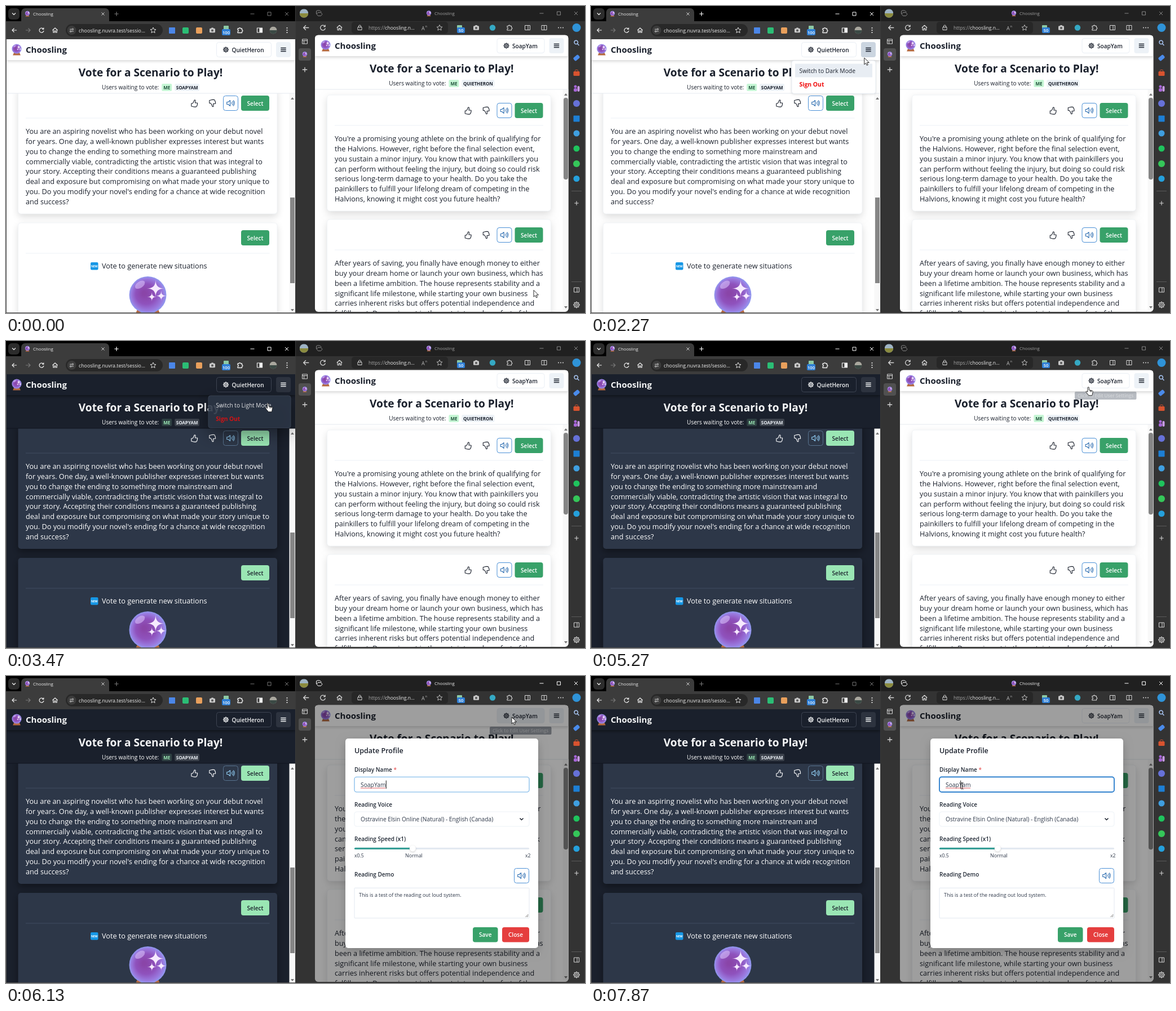
Write an HTML page with a canvas that moves like this. It is 1027x545 px and loops after 8 s.

```html
<!DOCTYPE html>
<html lang="en">
<head>
<meta charset="utf-8">
<title>Choosling</title>
<style>
html, body { margin: 0; width: 100%; height: 100%; overflow: hidden; background: #000; }
canvas { display: block; width: 1027px; height: 545px; }
</style>
</head>
<body>
<canvas id="stage"></canvas>
<script>
const W = 1027, H = 545, LOOP = 8000, STEP = 200 / 3;
const canvas = document.getElementById('stage');
const dpr = window.devicePixelRatio || 1;
canvas.width = W * dpr;
canvas.height = H * dpr;
const c = canvas.getContext('2d');
c.scale(dpr, dpr);

const FONT = '"Open Sans", "Noto Sans", sans-serif';
const BODY = 12.68, LABEL = 10.3;
const APP = 'Choosling', LEFT_USER = 'QuietHeron', RIGHT_USER = 'SoapYam';

const light = {
  bg: '#fff', card: '#fff', text: '#1a202c', body: '#1a202c', line: '#edf2f7', border: '#e9eef4',
  burger: '#edf2f7', hover: '#e2e8f0', pressed: '#cbd5e0', go: '#38a169', goHover: '#2f855a', goText: '#fff',
  meBg: '#c6f6d5', me: '#22543d', badgeBg: '#edf2f7', badge: '#1a202c',
  sound: '#2b6cb0', soundBorder: '#4a8fd6', shadow: 'rgba(0,0,0,.14)', menu: '#fff'
};
const dark = {
  bg: '#1a202c', card: '#2d3748', text: '#f4f5f6', body: '#fff', line: '#414d60', border: '#3d4452',
  burger: '#2d333f', hover: '#3d4452', pressed: '#4a5160', go: '#9ae6b4', goHover: '#68d391', goText: '#1a202c',
  meBg: '#2e4042', me: '#9ae6b4', badgeBg: '#3c424c', badge: '#e8edf3',
  sound: '#90cdf4', soundBorder: '#58738f', shadow: 'rgba(0,0,0,.4)', menu: '#2d3748'
};

const novel = [
  'You are an aspiring novelist who has been working on your debut novel',
  'for years. One day, a well-known publisher expresses interest but wants',
  'you to change the ending to something more mainstream and',
  'commercially viable, contradicting the artistic vision that was integral to',
  'your story. Accepting their conditions means a guaranteed publishing',
  'deal and exposure but compromising on what made your story unique to',
  "you. Do you modify your novel's ending for a chance at wide recognition",
  'and success?'];
const athlete = [
  "You're a promising young athlete on the brink of qualifying for",
  'the Halvions. However, right before the final selection event,',
  'you sustain a minor injury. You know that with painkillers you',
  'can perform without feeling the injury, but doing so could risk',
  'serious long-term damage to your health. Do you take the',
  'painkillers to fulfill your lifelong dream of competing in the',
  'Halvions, knowing it might cost you future health?'];
const savings = [
  'After years of saving, you finally have enough money to either',
  'buy your dream home or launch your own business, which has',
  'been a lifetime ambition. The house represents stability and a',
  'significant life milestone, while starting your own business',
  'carries inherent risks but offers potential independence and',
  'fulfillment. Do you invest in the certainty and comfort of the'];

// Icons are centred on 0,0.
const icons = {
  back: 'M4 0H-4M-.5-3.5L-4 0L-.5 3.5', fwd: 'M-4 0H4M.5-3.5L4 0L.5 3.5',
  reload: 'M3.2-2.4A4 4 0 1 0 4 .8M3.8-4.6v2.8H1', home: 'M-4.5 0L0-4L4.5 0M-3.2-1V4H-1V1H1V4H3.2V-1',
  plus: 'M-3.7 0h7.4M0-3.7v7.4', min: 'M-3.5 0h7', max: 'M-3-3h6v6h-6z', close: 'M-3-3L3 3M3-3L-3 3',
  down: 'M-3-1.5L0 1.5L3-1.5',
  star: 'M0-5L1.5-1.6 5-1.3 2.3 1 3.1 4.6 0 2.7-3.1 4.6-2.3 1-5-1.3-1.5-1.6z',
  puzzle: 'M-4-3h2.3a1.4 1.4 0 0 1 2.8 0H3.5V-.5a1.4 1.4 0 0 1 0 2.8V4.5H-4V2.3a1.4 1.4 0 0 0 0-2.8z',
  lock: 'M-3.5-1h7v5h-7zM-2-1v-1.5a2 2 0 0 1 4 0V-1M0 1v1', split: 'M-4.5-4h9v8h-9zM0-4v8',
  panel: 'M-4.5-4h9v8h-9zM1-4v8', tabs: 'M-4.5-4h9v8h-9zM-4.5-1.5h9M-1.5-1.5v5.5',
  search: 'M1.5 1.5L4.5 4.5M2.4-1a3.2 3.2 0 1 1-6.4 0a3.2 3.2 0 1 1 6.4 0',
  burger: 'M-4.7-3h9.4M-4.7 0h9.4M-4.7 3h9.4',
  stack: 'M-5-3a2 2 0 0 1 2-2h4l3 3M-2-1.5h5l2.5 3-2.5 3h-5l-2.5-3zM-5-3v4',
  tune: 'M-4-2H0M3.6-2a1.5 1.5 0 1 1-3 0a1.5 1.5 0 1 1 3 0M4 2.3H0M-.6 2.3a1.5 1.5 0 1 1-3 0a1.5 1.5 0 1 1 3 0',
  thumb: 'M-5.2 0H-3L-.6-3.6L-.2-5.6C1.4-7 2.4-5.4 2-3.6L1.5-1H4.6c1.5 0 1.3 1.7.6 2 .6.6.3 1.6-.3 1.9.3.8 0 1.4-.6 1.7 0 1-.6 1.5-1.5 1.5H0C-1.8 6.1-2.4 5-5.2 5z',
  sound: 'M-6.3-2h2.4l3.5-3v10l-3.5-3h-2.4zM1.9-1.9a3 3 0 0 1 0 3.8M3.6-3.6a5.4 5.4 0 0 1 0 7.2M5.2-5.1a7.6 7.6 0 0 1 0 10.2'
};
const cursors = {
  arrow: 'M0 0V11.8L2.7 9.3 4.5 13.3 6.5 12.4 4.7 8.5H8.5z',
  hand: 'M0 1a1.2 1.2 0 0 1 2.4 0V5l5.4 1.2c1.1.3 1.5 1 1.4 2L8.5 12c-.2 1.2-.5 2-.9 2.8H2C.6 13-1 11-2.8 8.8c-.8-1.3.8-2.2 1.8-1.2L0 8.5z',
  beam: 'M-2.2-5.8Q0-5.8 0-4.8Q0-5.8 2.2-5.8M0-5V5M-2.2 5.8Q0 5.8 0 4.8Q0 5.8 2.2 5.8'
};
for (const set of [icons, cursors]) for (const k in set) set[k] = new Path2D(set[k]);

const clamp = v => Math.max(0, Math.min(1, v));
const ramp = (t, from, ms) => clamp((t - from) / ms);

function rect(x, y, w, h, fill, r = 0, stroke, lw = 1) {
  c.beginPath();
  c.roundRect(x, y, w, h, r);
  if (fill) { c.fillStyle = fill; c.fill(); }
  if (stroke) { c.strokeStyle = stroke; c.lineWidth = lw; c.stroke(); }
}
function dot(x, y, r, fill) {
  c.fillStyle = fill;
  c.beginPath();
  c.arc(x, y, r, 0, 7);
  c.fill();
}
function text(s, x, y, size, color, weight = 400, align = 'left') {
  c.font = `${weight} ${size}px ${FONT}`;
  c.textAlign = align;
  c.fillStyle = color;
  c.fillText(s, x, y);
  return c.measureText(s).width;
}
function icon(name, x, y, color, lw = 1.1, sx = 1, sy = sx) {
  c.save();
  c.translate(x, y);
  c.scale(sx, sy);
  c.strokeStyle = color;
  c.lineWidth = lw;
  c.lineJoin = 'round';
  c.stroke(icons[name]);
  c.restore();
}
function shadow(color, blur, dy) {
  c.shadowColor = color;
  c.shadowBlur = blur * dpr;
  c.shadowOffsetY = dy * dpr;
}
const noShadow = () => shadow('transparent', 0, 0);
function faded(alpha, draw) {
  if (alpha <= 0) return;
  c.save();
  c.globalAlpha = alpha;
  draw();
  c.restore();
}
function clipped(x, y, w, h, r, draw) {
  c.save();
  c.beginPath();
  c.roundRect(x, y, w, h, r);
  c.clip();
  draw();
  c.restore();
}

function gear(x, y, color, r = 3.4) {
  c.strokeStyle = color;
  c.lineWidth = 1.1;
  c.beginPath();
  for (let i = 0; i <= 64; i++) {
    const a = i / 64 * Math.PI * 2, d = r + .3 + Math.tanh(3 * Math.cos(a * 8)) * .8;
    c.lineTo(x + Math.cos(a) * d, y + Math.sin(a) * d);
  }
  c.closePath();
  c.stroke();
  c.beginPath();
  c.arc(x, y, r * .42, 0, 7);
  c.stroke();
}
function sparkle(x, y, r) {
  c.fillStyle = '#f6eaff';
  c.beginPath();
  c.moveTo(x, y - r);
  for (let i = 1; i <= 4; i++) {
    const a = i * Math.PI / 2 - Math.PI / 2;
    c.quadraticCurveTo(x, y, x + Math.cos(a) * r, y + Math.sin(a) * r);
  }
  c.fill();
}
function ball(x, y, r) {
  c.fillStyle = '#b5693f';
  c.beginPath();
  c.moveTo(x - r * .55, y + r * .75);
  c.lineTo(x + r * .55, y + r * .75);
  c.lineTo(x + r * .8, y + r * 1.35);
  c.lineTo(x - r * .8, y + r * 1.35);
  c.fill();
  const g = c.createRadialGradient(x - r * .2, y - r * .1, r * .1, x, y, r);
  g.addColorStop(0, '#8a45a8');
  g.addColorStop(.5, '#8f52bd');
  g.addColorStop(.85, '#9a7be0');
  g.addColorStop(1, '#8f9af0');
  dot(x, y, r, g);
  c.fillStyle = 'rgba(215,190,248,.6)';
  c.beginPath();
  c.ellipse(x - r * .42, y - r * .55, r * .3, r * .17, -.6, 0, 7);
  c.fill();
  sparkle(x + r * .42, y - r * .35, r * .46);
  sparkle(x + r * .72, y + r * .05, r * .26);
  sparkle(x + r * .22, y + r * .1, r * .24);
}

function button(x, y, w, h, label, fill, color) {
  rect(x, y, w, h, fill, 4);
  text(label, x + w / 2, y + h / 2 + 4, 10.1, color, 600, 'center');
}
function soundButton(x, y, p) {
  rect(x + .5, y + .5, 26, 26, null, 4, p.soundBorder);
  icon('sound', x + 13, y + 13.5, p.sound, 1.1);
}
function card(x, y, w, h, p, lines, hover, plain) {
  shadow(p.shadow, 13, 5);
  rect(x, y, w, h, p.card, 5);
  noShadow();
  if (p === light) rect(x, y, w, h, null, 5, '#eef1f5', .8);
  const r = x + w - 14;
  if (!plain) {
    icon('thumb', r - 133, y + 28, p.body, 1.1);
    icon('thumb', r - 101, y + 27.5, p.body, 1.1, 1, -1);
    soundButton(r - 82, y + 14, p);
  }
  button(r - 50, y + 14 - (plain ? 1 : 0), 50, 27, 'Select', hover ? p.goHover : p.go, p.goText);
  rect(x + 13.5, y + 53.5, w - 27, 1, p.line);
  lines.forEach((s, i) => text(s, x + 13.5, y + 82.3 + i * 17.75, BODY, p.body));
}
function scrollbar(x, top, bottom, from, to, round) {
  rect(x, top, 10.5, bottom - top, '#f8f8f8');
  rect(x + 1.5, from, 8, to - from, '#868686', round);
  c.fillStyle = '#777';
  for (const [y, d] of [[top + 9, -1], [bottom - 5, 1]]) {
    c.beginPath();
    c.moveTo(x + 2.5, y - d * 2);
    c.lineTo(x + 8.5, y - d * 2);
    c.lineTo(x + 5.5, y + d * 2);
    c.fill();
  }
}
function badge(s, x, y, w, bg, color) {
  rect(x, y, w, 13, bg, 2);
  text(s, x + w / 2, y + 9.5, 8, color, 700, 'center');
}
function page(x, y, w, p, user, other, burger, userBg) {
  const cx = x + w / 2, r = x + w;
  c.font = `400 10.1px ${FONT}`;
  const label = 'Users waiting to vote:', lw = c.measureText(label).width;
  c.font = `700 8px ${FONT}`;
  const bw = c.measureText(other).width + 5;
  rect(x, y + 37, w, 59, p.bg);
  rect(x, y + 95.5, w, 1, p === light ? '#e6eaef' : '#11151e');
  shadow(p === light ? 'rgba(0,0,0,.17)' : 'rgba(0,0,0,.45)', 5, 2);
  clipped(x, y, w, 48, 0, () => rect(x, y, w, 37, p.bg));
  noShadow();
  ball(x + 19, y + 17, 8.6);
  text(APP, x + 35, y + 24, 15, p.text, 700);
  const bx = r - 42 - (user === LEFT_USER ? 98 : 85);
  rect(bx + .5, y + 5.5, r - 43 - bx, 26, userBg, 4, p.border);
  gear(bx + 17, y + 18.5, p.text);
  text(user, bx + 27.5, y + 22.5, 10.1, p.text, 600);
  rect(r - 34, y + 5, 26, 27, burger, 4);
  icon('burger', r - 21, y + 18.5, p.text, 1.3);
  text('Vote for a Scenario to Play!', cx, y + 66, 19.1, p.text, 700, 'center');
  const ux = cx - (lw + 28 + bw) / 2;
  text(label, ux, y + 89.2, 10.1, p.body);
  badge('ME', ux + lw + 5, y + 79, 18, p.meBg, p.me);
  badge(other, ux + lw + 28, y + 79, bw, p.badgeBg, p.badge);
}

function leftChrome(active) {
  const lit = active ? '#fff' : '#777';
  rect(0, 0, 513, 28, '#000');
  rect(4, 4, 20, 20, '#2c2c2c', 6);
  icon('down', 14, 14, '#e8e8e8', 1.3);
  rect(27, 4, 156, 30, '#3c3c3c', 7);
  ball(38, 13, 4.2);
  text(APP, 48, 17, 7.8, '#eee');
  icon('close', 172, 14, '#ddd', 1.1, .85);
  icon('plus', 196, 14, lit, 1.2);
  icon('min', 437, 14, lit, 1);
  icon('max', 467, 14, lit, 1);
  icon('close', 498, 14, lit, 1);
  rect(0, 27, 513, 32, '#3c3c3c');
  icon('back', 15, 43, '#eee', 1.2);
  icon('fwd', 39, 43, '#777', 1.2);
  icon('reload', 63, 43, '#eee', 1.2);
  icon('home', 87, 43, '#eee', 1.2);
  rect(106, 32, 172, 22, '#282828', 11);
  dot(116.5, 43, 8, '#3c3c3c');
  icon('tune', 116.5, 43, '#eee', 1, .85);
  text('choosling.nuvra.test/sessio…', 129, 46.5, 8.8, '#eee');
  icon('star', 261, 43, '#ddd', 1);
  rect(289, 38, 11, 11, '#4b86e8', 1);
  rect(313, 38, 11, 11, '#2bbd75', 2);
  rect(337, 38, 11, 11, '#e9a05c', 2);
  camera(366, 43);
  rect(386, 35, 9, 7, '#8cc9a4', 1);
  rect(383, 41, 15, 11, '#2f7fd6', 2);
  text('100', 390.5, 49.6, 7.5, '#fff', 600, 'center');
  icon('puzzle', 415, 43, '#eee', 1.3);
  icon('split', 450, 43, '#eee', 1.2);
  rect(450, 39, 4.5, 8, '#eee');
  photo(474, 43, 6.5, '#a9a79e', '#3b4a45');
  for (const y of [39, 43, 47]) dot(498.5, y, 1.1, '#eee');
}
function camera(x, y) {
  rect(x - 5, y - 3.2, 10, 7.4, '#c9c9c9', 1.5);
  rect(x - 2, y - 4.5, 4, 2, '#c9c9c9', 1);
  dot(x, y + .5, 2, '#555');
}
function photo(x, y, r, top, low) {
  clipped(x - r, y - r, r * 2, r * 2, r, () => {
    rect(x - r, y - r, r * 2, r * 2, top);
    rect(x - r, y, r * 2, r, low);
  });
}
function rightChrome(active) {
  const lit = active ? '#fff' : '#858585', grey = '#d6d6d6';
  rect(514, 0, 513, 545, '#333');
  rect(514, 0, 513, 27, '#202020');
  photo(528.5, 13, 7.7, '#9fb4c4', '#8b8b3e');
  icon('stack', 555.5, 13, lit, 1);
  ball(750, 12.5, 4.2);
  text(APP, 760, 16.3, 7.8, active ? '#eee' : '#a0a0a0');
  icon('min', 950, 13, lit, 1);
  icon('max', 980.5, 13, lit, 1);
  icon('close', 1011, 13, lit, 1);
  icon('back', 532.5, 38.5, grey, 1.1, 1.2);
  icon('reload', 562, 38.5, grey, 1.1, 1.1);
  icon('home', 591.5, 38.5, grey, 1.1, 1.05);
  rect(613, 28, 171, 21, '#272727', 5);
  icon('lock', 627.5, 38.5, grey, 1);
  const w = text('https://', 643, 42, 8.6, '#a5a5a5');
  text('choosling.n...', 643 + w, 42, 8.6, '#eee');
  text('A', 737, 42.5, 9, '#bbb');
  text('n', 743.5, 38, 5.5, '#bbb');
  icon('star', 769, 38.5, '#bbb', 1);
  rect(800, 34, 9, 8, '#8cc9a4', 1);
  rect(800, 38, 14, 10, '#2f7fd6', 2);
  text('50', 807, 46, 7.5, '#fff', 600, 'center');
  camera(834, 38.5);
  dot(863, 38.5, 5.2, '#35a9c4');
  icon('puzzle', 893, 38.5, grey, 1.1);
  icon('panel', 925, 38.5, grey, 1);
  icon('split', 954.5, 38.5, grey, 1);
  for (const x of [980, 984, 988]) dot(x, 38.5, 1, grey);
  dot(1012, 38.5, 7.5, '#2f93d8');

  icon('tabs', 530, 63, grey, 1);
  rect(519, 75, 22, 22, '#505050', 4);
  ball(530, 85.3, 4.2);
  icon('plus', 530, 113, grey, 1.1, 1.15);

  icon('search', 1012, 65.5, '#a9c7f5', 1.5);
  c.save();
  c.translate(1012, 92);
  c.rotate(-.7);
  rect(-5.5, -3.5, 11, 7, '#4a8bea', 2);
  c.restore();
  rect(1006.5, 116, 11, 8, '#d8532f', 1.5);
  rect(1009.5, 113.5, 5, 3, null, 1, '#d8532f');
  dot(1010, 143, 2.5, '#a765d8');
  rect(1007, 146, 6, 6, '#a765d8', 2);
  rect(1013.5, 142, 4, 10, '#c99be8', 2);
  dot(1012, 173, 6, '#6671d8');
  rect(1006.5, 194.5, 11, 11, '#1d7fd4', 1);
  dot(1012, 226, 5.5, '#3f9fe0');
  dot(1012, 253, 5.5, '#1fc45d');
  dot(1012, 280, 6, '#35c759');
  dot(1012, 306.5, 5.5, '#25a0dc');
  rect(1003, 328, 18, 1, '#5a5a5a');
  icon('plus', 1012, 350, grey, 1.1);
  rect(1003, 489, 18, 1, '#5a5a5a');
  icon('panel', 1012, 504, grey, 1);
  gear(1012, 530.5, grey, 4.1);
}

function menu(t, p) {
  const closing = t >= 3460;
  const k = closing ? .9 : ramp(t, 1470, 200);
  if (t >= 3525) return;
  faded(closing ? .86 : k, () => {
    const s = closing ? .98 : .8 + .2 * k;
    c.translate(505, 97);
    c.scale(s, s);
    c.translate(-505, -97);
    if (p === light) shadow('rgba(0,0,0,.15)', 4, 1);
    else shadow('rgba(0,0,0,.5)', 30, 10);
    rect(356, 97, 149, 58.5, p.menu, 4);
    noShadow();
    rect(356, 97, 149, 58.5, null, 4, p === light ? '#e6ebf1' : '#3c4656');
    if (!closing) rect(362, 102.5, 137, 24, t >= 3195 ? '#dfe5ee' : '#e8edf3');
    text(`Switch to ${p === light ? 'Dark' : 'Light'} Mode`, 369.5, 118.5, LABEL, p.body);
    text('Sign Out', 369.5, 143, 10.4, '#f00d0d', 700);
  });
}
function leftWindow(t) {
  const p = t < 3460 ? light : dark;
  rect(0, 59, 513, 486, p.bg);
  clipped(0, 155, 513, 390, 0, () => {
    card(21.5, 145, 459.5, 224, p, novel, t > 330 && t < 900);
    card(21.5, 385, 459.5, 200, p, [], false, true);
    rect(150, 455, 13.5, 13.5, '#1697e6', 2);
    text('NEW', 156.8, 464, 5, '#fff', 700, 'center');
    text('Vote to generate new situations', 170, 466.3, BODY, p.body);
    ball(251.5, 513, 33);
    scrollbar(502.5, 155, 545, 340, 492, 0);
  });
  const open = t >= 1500 && t < 3460, over = t > 1120 && t < 2200;
  page(0, 59, 513, p, LEFT_USER, RIGHT_USER.toUpperCase(), open ? p.pressed : over ? p.hover : p.burger, p.bg);
  if (t > 1500) menu(t, p);
  rect(0, 59, 1, 486, '#4c4c4c');
  rect(0, 544, 513, 1, '#4c4c4c');
  leftChrome(t >= 1460 && t < 5790);
  rect(513, 0, 1, 545, '#3a3a3a');
}

function tooltip(t) {
  faded(ramp(t, 5195, 200) * (1 - ramp(t, 6000, 270)), () => {
    rect(858, 90, 109.5, 14, '#3a4454', 2);
    text('Click to Edit User Settings', 912.5, 100.2, 8.1, '#fff', 600, 'center');
  });
}
function modal(t) {
  const label = (s, y) => text(s, 618, y, 10, '#1f2733', 600);
  const ink = '#2d3748', edge = '#e2e8f0';
  shadow('rgba(0,0,0,.2)', 16, 6);
  rect(602, 111, 342, 372, '#fff', 5);
  noShadow();
  text('Update Profile', 618, 136.7, 12.5, '#1a202c', 600);
  label('Display Name', 170);
  text('*', 687.5, 170, 10, '#e53e3e');
  const ring = t > 6190;
  rect(618, 179.2, 310, 26.8, '#fff', 4, ring ? '#3182ce' : '#6aaee6', ring ? 1.9 : 1.1);
  const w = text(RIGHT_USER, 629, 197, LABEL, ink);
  c.strokeStyle = '#e0565b';
  c.lineWidth = .8;
  c.beginPath();
  for (let x = 0; x <= w; x++) c.lineTo(629 + x, 199 + (x % 2 ? .7 : -.7));
  c.stroke();
  const moved = t >= 7590;
  const shown = moved ? t >= 7860 : t >= 6060 && Math.floor((t - 6060) / 500) % 2 === 0;
  if (shown) rect(moved ? 655.2 : 629 + w + .3, 185.5, 1, 14.5, '#111');

  label('Reading Voice', 231.8);
  rect(618, 241, 310, 26, '#fff', 4, '#edf2f7');
  text('Ostravine Elsin Online (Natural) - English (Canada)', 629, 257.7, 10.2, ink);
  icon('down', 914.5, 254, '#1a202c', 1.5);
  label('Reading Speed (x1)', 293.2);
  rect(618, 304.7, 310, 3, edge, 1.5);
  rect(618, 304.7, 103, 3, '#2c9a91', 1.5);
  shadow('rgba(0,0,0,.2)', 3, 1);
  dot(721.3, 306.2, 5.5, '#fff');
  noShadow();
  text('x0.5', 618, 322, 8.7, ink);
  text('Normal', 708, 322, 8.8, ink);
  text('x2', 921, 322, 8.7, ink);
  label('Reading Demo', 356.3);
  soundButton(901, 341, light);
  rect(618, 376.3, 310, 53.5, '#fff', 1, edge);
  text('This is a test of the reading out loud system.', 626, 392, 8.87, ink);
  c.strokeStyle = '#555';
  c.lineWidth = .8;
  c.beginPath();
  for (const d of [5, 2.5]) { c.moveTo(926.5 - d, 428); c.lineTo(926.5, 428 - d); }
  c.stroke();
  button(828, 446, 44.5, 26.5, 'Save', '#38a169', '#fff');
  button(880, 446, 48, 26.5, 'Close', '#e53e3e', '#fff');
}
function rightWindow(t) {
  rightChrome(t >= 5790);
  clipped(548, 51.5, 449.5, 491.5, 6, () => {
    rect(548, 51, 450, 493, '#fff');
    clipped(548, 148, 450, 396, 0, () => {
      card(569.5, 158, 397, 206, light, athlete);
      card(569.5, 379, 397, 200, light, savings);
      scrollbar(987.5, 148, 540, 163, 308, 3.7);
    });
    const pressed = t >= 5790 && t < 6300;
    page(548, 52, 449.5, light, RIGHT_USER, LEFT_USER.toUpperCase(), light.burger, pressed ? '#edf2f7' : '#fff');
    tooltip(t);
    const k = ramp(t, 5800, 200);
    faded(.38 * k, () => rect(548, 51, 450, 493, '#000'));
    faded(k, () => {
      const s = .95 + .05 * k;
      c.translate(773, 297);
      c.scale(s, s);
      c.translate(-773, -297);
      modal(t);
    });
  });
}

// Each leg: start time, end time, target x, target y.
const legs = [
  [0, 400, 455, 173], [533, 1200, 496, 82], [2003, 2670, 463.5, 111], [4463, 4733, 807, 93.5],
  [5003, 5267, 881, 82], [5267, 5533, 897, 73], [6200, 6600, 709, 185], [6600, 7467, 658.5, 195]];
const over = (x, y, l, t, r, b) => x >= l && x <= r && y >= t && y <= b;

function pointer(t) {
  let x = 936, y = 504.5;
  for (const [from, to, tx, ty] of legs) {
    const k = ramp(t, from, to - from), e = k * k * (3 - 2 * k);
    x += (tx - x) * e;
    y += (ty - y) * e;
  }
  let kind = 'arrow';
  if (t >= 5900) {
    if (over(x, y, 618, 179, 928, 206)) kind = 'beam';
  } else if (over(x, y, 417, 159, 467, 186) || over(x, y, 479, 64, 505, 91) ||
      over(x, y, 870, 57, 955, 84) || (t > 1600 && over(x, y, 356, 97, 505, 155))) kind = 'hand';
  c.save();
  c.translate(x, y);
  c.lineJoin = 'round';
  if (kind === 'beam') {
    c.strokeStyle = '#222';
    c.lineWidth = .9;
  } else {
    c.fillStyle = '#fff';
    c.fill(cursors[kind]);
    c.strokeStyle = '#111';
    c.lineWidth = .9;
  }
  c.stroke(cursors[kind]);
  if (kind === 'hand') {
    c.beginPath();
    for (const d of [4.5, 6.7]) { c.moveTo(d, 5.8); c.lineTo(d, 8.5); }
    c.stroke();
  }
  c.restore();
}

function draw(t) {
  rect(0, 0, W, H, '#000');
  leftWindow(t);
  rightWindow(t);
  pointer(t);
}

const start = performance.now();
let last = -1;
function tick() {
  const t = (performance.now() - start) % LOOP;
  const step = Math.floor((t + 5) / STEP);
  if (step !== last) {
    last = step;
    draw(step * STEP % LOOP);
  }
  requestAnimationFrame(tick);
}
tick();
</script>
</body>
</html>
```
